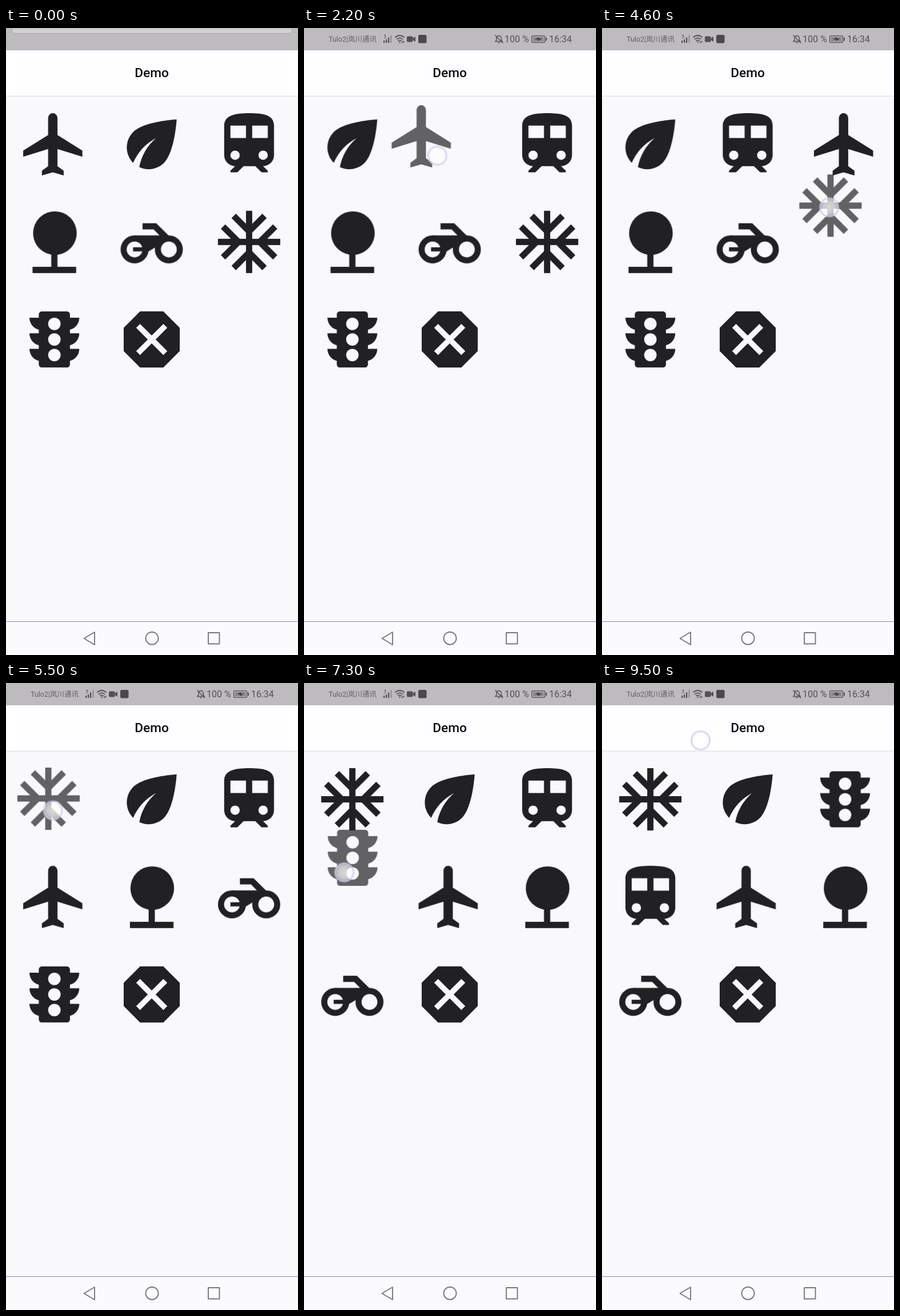
An HTML page without scripts for the animation above (9.6 s loop, 511 px wide and 1097 px high).

```html
<!DOCTYPE html>
<html lang="en">
<head>
<meta charset="utf-8">
<title>Reorderable grid</title>
<style>
html, body { margin: 0; width: 100%; height: 100%; overflow: hidden; background: #f9f8fb; }
svg {
  display: block; width: 511px; height: 1097px;
  font-family: Roboto, "Noto Sans CJK SC", "Noto Sans CJK", sans-serif;
  /* grid cells, row by row */
  --c1: translate(0px, 0px); --c2: translate(170.4px, 0px); --c3: translate(340.8px, 0px);
  --c4: translate(0px, 170.8px); --c5: translate(170.4px, 170.8px); --c6: translate(340.8px, 170.8px);
  --c7: translate(0px, 341.4px); --c8: translate(170.4px, 341.4px);
}
.leaf, .train, .tree, .moto, .plane, .snow, .lights { animation: 9.6s linear infinite; }
.leaf { animation-name: leaf; }
.train { animation-name: train; }
.tree { animation-name: tree; }
.moto { animation-name: moto; }
.plane { animation-name: plane; }
.snow { animation-name: snow; }
.lights { animation-name: lights; }
.stop { transform: var(--c8); }
/* the finger runs a little ahead of the dragged icon */
.lead { animation-delay: -80ms; }

.icon { fill: #212022; transform: translate(19.2px, 138.1px) scale(5.45); }
.lift1, .lift2, .lift3, .tap1, .tap2, .tap3, .tap4, .bar, .shade { animation: 9.6s step-end infinite; }
.lift1 { animation-name: lift1; }
.lift2 { animation-name: lift2; }
.lift3 { animation-name: lift3; }
.tap1 { animation-name: tap1; }
.tap2 { animation-name: tap2; }
.tap3 { animation-name: tap3; }
.tap4 { animation-name: tap4; }
.bar { animation-name: bar; }
.shade { animation-name: shade; }

@keyframes leaf {
  0%, 20.83% { transform: var(--c2); }
  22.7%, 54.17% { transform: var(--c1); }
  56.25%, 80.2% { transform: var(--c2); }
  82.3%, 84.4% { transform: var(--c3); }
  86.5%, 100% { transform: var(--c2); }
}
@keyframes train {
  0%, 26.04% { transform: var(--c3); }
  28.13%, 52.08% { transform: var(--c2); }
  54.69%, 80.2% { transform: var(--c3); }
  82.8%, 100% { transform: var(--c4); }
}
@keyframes tree {
  0%, 48.96% { transform: var(--c4); }
  51.04%, 72.4% { transform: var(--c5); }
  74.48%, 100% { transform: var(--c6); }
}
@keyframes moto {
  0%, 48.96% { transform: var(--c5); }
  51.04%, 72.4% { transform: var(--c6); }
  74.48%, 100% { transform: var(--c7); }
}
@keyframes plane {
  0%, 15.62% { transform: var(--c1); }
  18.23% { transform: translate(8px, -4px); }
  20.83% { transform: translate(62px, -12px); }
  22.917% { transform: translate(123px, -14px); }
  23.958% { transform: translate(153px, -13.5px); }
  26.04% { transform: translate(215px, -8px); }
  29.17% { transform: translate(305px, -5px); }
  32.29% { transform: translate(333px, -3px); }
  33.3% { transform: translate(336px, -2px); }
  33.33%, 48.96% { transform: var(--c3); }
  51.04%, 72.4% { transform: var(--c4); }
  74.48%, 100% { transform: var(--c5); }
}
@keyframes snow {
  0%, 43.75% { transform: var(--c6); }
  45.83% { transform: translate(334px, 145px); }
  47.917% { transform: translate(315.4px, 107.5px); }
  48.958% { transform: translate(302.5px, 85px); }
  50% { transform: translate(286px, 50px); }
  52.083% { transform: translate(190px, 12px); }
  54.167% { transform: translate(75px, -2px); }
  56.25% { transform: translate(0px, -3px); }
  57.29%, 59.34% { transform: translate(-10.6px, -1.5px); }
  59.37%, 100% { transform: var(--c1); }
}
@keyframes lights {
  0%, 68.75% { transform: var(--c7); }
  70.83% { transform: translate(2px, 318px); }
  72.917% { transform: translate(3px, 215px); }
  75% { transform: translate(1px, 122px); }
  76.04% { transform: translate(.5px, 102.5px); }
  77.08% { transform: translate(.4px, 94px); }
  78.125% { transform: translate(15px, 70px); }
  80.2% { transform: translate(110px, 0px); }
  81.77% { transform: translate(205px, -45px); }
  83.33% { transform: translate(251.4px, -56.5px); }
  84.375% { transform: translate(256px, -57px); }
  86.46% { transform: translate(325px, -25px); }
  88.02%, 88.5% { transform: translate(338px, -5px); }
  88.54%, 100% { transform: var(--c3); }
}
@keyframes lift1 { 0%, 33.33% { opacity: 1; } 15.62% { opacity: .7; } }
@keyframes lift2 { 0%, 59.37% { opacity: 1; } 43.75% { opacity: .7; } }
@keyframes lift3 { 0%, 88.54% { opacity: 1; } 68.75% { opacity: .7; } }
@keyframes tap1 { 0%, 33.33% { opacity: 0; } 10.41% { opacity: 1; } }
@keyframes tap2 { 0%, 59.37% { opacity: 0; } 37.5% { opacity: 1; } }
@keyframes tap3 { 0%, 88.54% { opacity: 0; } 64.58% { opacity: 1; } }
@keyframes tap4 { 0% { opacity: 0; } 98.95%, 100% { opacity: 1; } }
@keyframes bar { 0% { opacity: 0; } 1.04%, 100% { opacity: 1; } }
@keyframes shade { 0% { opacity: 1; } 1.04%, 100% { opacity: 0; } }
</style>
</head>
<body>
<svg viewBox="0 0 511 1097" xmlns="http://www.w3.org/2000/svg">
  <defs>
    <radialGradient id="glow">
      <stop offset="0" stop-color="#fff" stop-opacity=".76"/>
      <stop offset=".7" stop-color="#fdfcff" stop-opacity=".66"/>
      <stop offset="1" stop-color="#f4f0ff" stop-opacity=".5"/>
    </radialGradient>
    <g id="tap">
      <circle r="17.4" fill="none" stroke="#cfc6e6" stroke-opacity=".25" stroke-width="2"/>
      <circle r="15.8" fill="url(#glow)" stroke="#d2cbe8" stroke-opacity=".85" stroke-width="2"/>
    </g>
  </defs>

  <rect width="511" height="1097" fill="#f9f8fb"/>

  <!-- status bar -->
  <rect width="511" height="39" fill="#bdbbbe"/>
  <g class="shade">
    <path d="M10.5 0V3Q11 9.500 17 9.500H494Q500 9.500 500.500 3V0Z" fill="#d2d0d3" stroke="#a9a7aa"/>
  </g>
  <g class="bar" fill="#525053">
    <text x="43" y="24" font-size="12.5" fill="#5f5d60">Tulo2|岚川通讯</text>
    <path d="M139 22h2.200v4h-2.200zM143 20h2.200v6h-2.200zM147 16.500h2.200v9.500h-2.200z"/>
    <path d="M151.500 12.500h2v13.500h-2z" opacity=".45"/>
    <path d="M140 12.500h3l-1.500 2.200q2 .3 1.300 2t-2.800.8" fill="none" stroke="#525053"/>
    <g fill="none" stroke="#525053" stroke-width="1.700">
      <path d="M159.500 16.500Q167.500 9.500 175.500 16.500M162 19.800Q167.500 14.800 173 19.800M164.500 22.700Q167.500 20.200 170.500 22.700"/>
    </g>
    <path d="M165.500 24h4l-2 2.500zM171.500 22.500h1.500v4h-1.500zM174 22.500h1.500v3h-1.500z"/>
    <rect x="180" y="14.500" width="10.500" height="10" rx="1.800"/>
    <path d="M190.500 18l4.500-3v9l-4.500-3z"/>
    <rect x="200" y="12" width="14.500" height="14.500" rx="2.500" fill="#4a484b"/>
    <g fill="none" stroke="#525053" stroke-width="1.500">
      <path d="M335 23.500H347L345.300 21V18.500Q345.300 14 341 13.500Q336.800 14 336.800 18.500V21ZM339.500 25.800H342.500M334.500 12.500L348 26.500"/>
    </g>
    <text x="351" y="25.200" font-size="16">100 %</text>
    <rect x="398.600" y="13.700" width="23" height="11.600" rx="2" fill="none" stroke="#525053" stroke-width="1.300"/>
    <rect x="400.500" y="15.500" width="19.200" height="8" rx=".8" fill="#8b898c"/>
    <rect x="423" y="16.500" width="2" height="6" rx=".8"/>
    <path d="M404 20l7-4v2.500h5.500l-7 4.500v-3z" fill="#3d3b3e"/>
    <text x="429" y="25.200" font-size="16">16:34</text>
  </g>

  <!-- title -->
  <rect y="39" width="511" height="80" fill="#fefdff"/>
  <rect y="118.500" width="511" height="1.200" fill="#dddce0"/>
  <text x="255" y="86" text-anchor="middle" font-size="22.700" font-weight="500" fill="#0c0b0d">Demo</text>

  <!-- navigation -->
  <rect y="1038" width="511" height="59" fill="#fbfafd"/>
  <rect y="1038" width="511" height="1" fill="#8d8b8f"/>
  <g fill="none" stroke="#79777a" stroke-width="1.900" stroke-linejoin="round">
    <path d="M136.500 1068L155 1057V1079Z"/>
    <circle cx="255.500" cy="1067.700" r="11"/>
    <rect x="354" y="1058" width="19.500" height="19.500"/>
  </g>

  <!-- icons -->
  <g class="stop"><path class="icon" d="M15.730 3H8.270L3 8.270v7.460L8.270 21h7.460L21 15.730V8.270zM17 15.740L15.740 17 12 13.260 8.260 17 7 15.740 10.740 12 7 8.260 8.260 7 12 10.740 15.740 7 17 8.260 13.260 12z"/></g>
  <g class="tree"><path class="icon" d="M13 16.120c3.470-.41 6.170-3.360 6.170-6.950a7 7 0 1 0-14 0c0 3.470 2.520 6.340 5.830 6.890V20H5v2h14v-2h-6z"/></g>
  <g class="moto"><g class="icon">
    <g fill="none" stroke="#212022" stroke-width="1.950">
      <circle cx="6.500" cy="14.400" r="3.520"/>
      <circle cx="17.500" cy="14.400" r="3.520"/>
    </g>
    <path d="M6.500 9.920H17.500L14.500 11.500 13.200 13.700 11 15.050H6v-1.350h3L10 12.500 6.500 11zM9.050 6H13.450L17.500 10H14.600L12.600 7.950H9.050z"/>
  </g></g>
  <g class="leaf"><path class="icon" d="M6.050 8.050c-2.730 2.730-2.730 7.150-.02 9.880 1.470-3.400 4.090-6.240 7.360-7.930-2.770 2.340-4.710 5.610-5.390 9.320 2.600 1.230 5.800.78 7.950-1.370C19.430 14.470 20 4 20 4S9.530 4.570 6.050 8.050z"/></g>
  <g class="train"><path class="icon" fill-rule="evenodd" d="M12 2c-4 0-8 .5-8 4v9.500C4 17.430 5.570 19 7.500 19L6 20.500v.5h2.230l2-2H14l2 2h2v-.5L16.500 19c1.930 0 3.500-1.570 3.500-3.500V6c0-3.500-3.580-4-8-4zM6 15.500a1.500 1.500 0 1 0 3 0a1.500 1.500 0 1 0-3 0zM6 6h5v4H6zM13 6h5v4h-5zM15 15.500a1.500 1.500 0 1 0 3 0a1.500 1.500 0 1 0-3 0z"/></g>
  <g class="plane"><g class="lift1"><path class="icon" d="M21 16v-2l-8-5V3.500a1.500 1.500 0 0 0-3 0V9l-8 5v2l8-2.500V19l-2 1.500V22l3.500-1 3.500 1v-1.500L13 19v-5.500z"/></g></g>
  <g class="snow"><g class="lift2"><path class="icon" d="M22 11h-4.170l3.240-3.240-1.410-1.420L15 11h-2V9l4.660-4.660-1.420-1.410L13 6.170V2h-2v4.170L7.760 2.930 6.340 4.340 11 9v2H9L4.340 6.340 2.930 7.760 6.170 11H2v2h4.170l-3.240 3.240 1.410 1.420L9 13h2v2l-4.660 4.660 1.420 1.410L11 17.830V22h2v-4.170l3.240 3.240 1.420-1.410L13 15v-2h2l4.660 4.660 1.410-1.420L17.830 13H22z"/></g></g>
  <g class="lights"><g class="lift3"><path class="icon" fill-rule="evenodd" d="M20 10h-3V8.860c1.720-.45 3-2 3-3.860h-3V4c0-.55-.45-1-1-1H8c-.55 0-1 .45-1 1v1H4c0 1.860 1.280 3.410 3 3.860V10H4c0 1.860 1.280 3.410 3 3.860V15H4c0 1.860 1.280 3.410 3 3.860V20c0 .55.45 1 1 1h8c.55 0 1-.45 1-1v-1.140c1.720-.45 3-2 3-3.860h-3v-1.140c1.720-.45 3-2 3-3.860zM10 7a2 2 0 1 0 4 0a2 2 0 1 0-4 0zM10 12a2 2 0 1 0 4 0a2 2 0 1 0-4 0zM10 17a2 2 0 1 0 4 0a2 2 0 1 0-4 0z"/></g></g>

  <!-- finger -->
  <g class="plane lead"><g class="tap1"><use href="#tap" x="86" y="237"/></g></g>
  <g class="snow lead"><g class="tap2"><use href="#tap" x="92.600" y="224.500"/></g></g>
  <g class="lights lead"><g class="tap3"><use href="#tap" x="70" y="235.700"/></g></g>
  <g class="tap4"><use href="#tap" x="172.500" y="100.500"/></g>
</svg>
</body>
</html>
```
